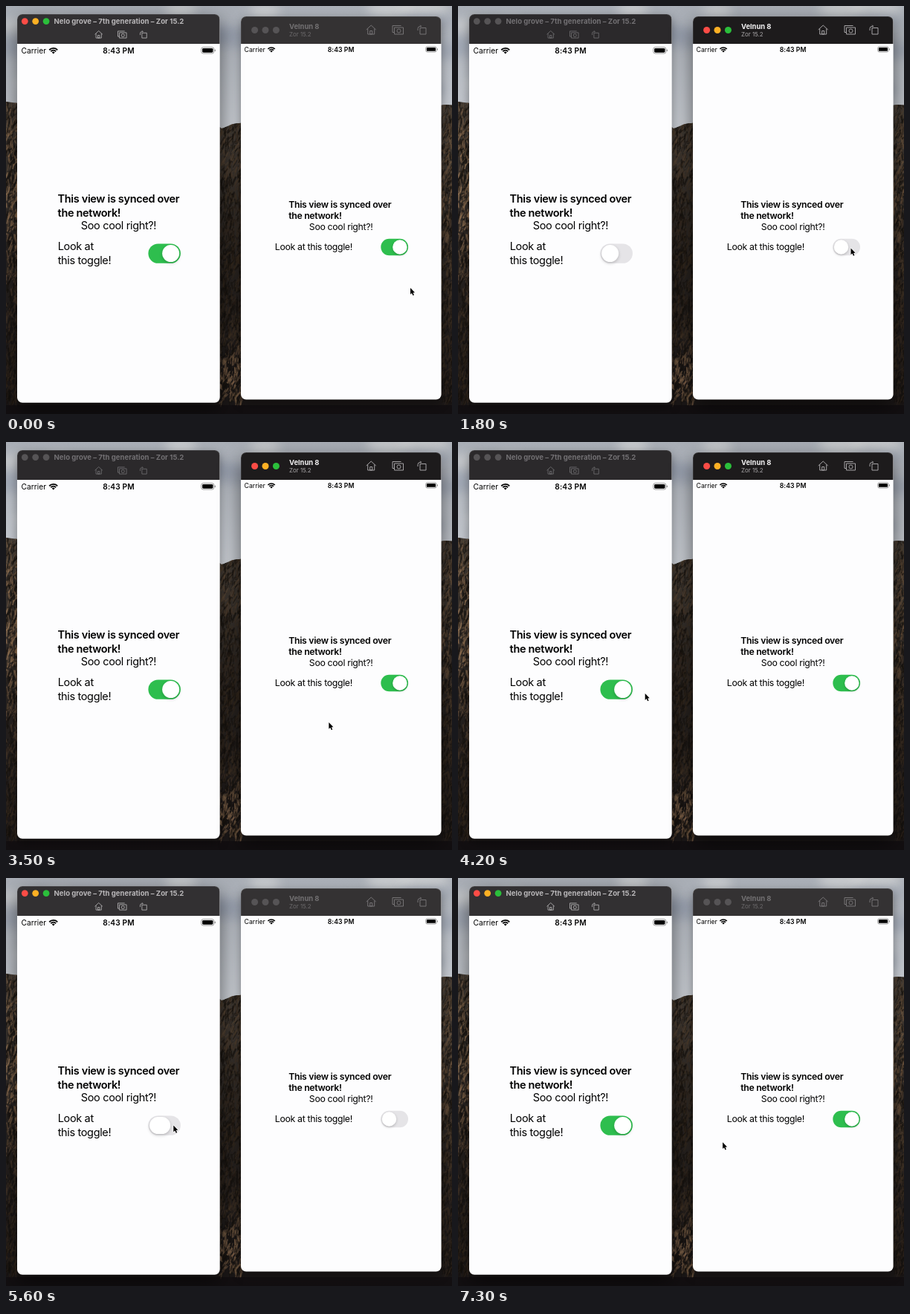
Animation of 600 by 550 pixels, one loop 7.5 s. Source, as an HTML page with a canvas:

```html
<!DOCTYPE html>
<html lang="en">
<head>
<meta charset="utf-8">
<title>Synced toggles</title>
<style>
html, body { margin: 0; width: 100%; height: 100%; overflow: hidden; background: #14110f; }
canvas { display: block; }
</style>
</head>
<body>
<canvas id="stage" width="600" height="550"></canvas>
<script>
const ctx = document.getElementById('stage').getContext('2d');
const LOOP = 7500, TICK = 100, BAR_END = 51;
const FONT = 'Inter, "Liberation Sans", sans-serif';

const clamp = v => Math.max(0, Math.min(1, v));
const mix = (a, b, k) => a + (b - a) * k;
const ramp = (t, start, length) => {
  const v = clamp((t - start) / length);
  return v * v * (3 - 2 * v);
};

function seeded(seed) {
  return () => (seed = (seed * 16807) % 2147483647) / 2147483647;
}

// Mountain backdrop, painted once
const ridge = x => x < 290 ? 129 + x * 0.12 : 164 - (x - 290) * (x < 450 ? 0.25 : 0.1) + Math.sin(x / 5);
const glow = (y, center, spread) => Math.exp(-(((y - center) / spread) ** 2));
function sunlight(x, y) {
  if (x < 20) return glow(y, 250, 130);
  return x < 320 ? 0.3 * glow(y, 200, 50) + 0.8 * glow(y, 510, 45) : 0.5 * glow(y, 240, 130);
}

function paintBackdrop() {
  const canvas = document.createElement('canvas');
  canvas.width = 600;
  canvas.height = 550;
  const c = canvas.getContext('2d');
  const rand = seeded(41);

  const sky = c.createLinearGradient(0, 0, 0, 170);
  sky.addColorStop(0, '#a9aeb6');
  sky.addColorStop(1, '#c9cdd3');
  c.fillStyle = sky;
  c.fillRect(0, 0, 600, 170);
  c.filter = 'blur(7px)';
  for (let i = 0; i < 26; i++) {
    c.fillStyle = i % 2 ? 'rgba(228,227,226,.5)' : 'rgba(132,144,164,.4)';
    c.beginPath();
    c.ellipse(rand() * 600, rand() * 140, 14 + rand() * 30, 5 + rand() * 10, 0, 0, 7);
    c.fill();
  }
  c.filter = 'none';

  c.beginPath();
  c.moveTo(0, 550);
  for (let x = 0; x <= 600; x += 2) c.lineTo(x, ridge(x));
  c.lineTo(600, 550);
  c.clip();
  const rock = c.createLinearGradient(0, 120, 0, 550);
  rock.addColorStop(0, '#443d36');
  rock.addColorStop(0.5, '#282320');
  rock.addColorStop(1, '#1a1616');
  c.fillStyle = rock;
  c.fillRect(0, 0, 600, 550);

  // Slanted streaks, brighter where the sun falls
  c.lineCap = 'round';
  for (const left of [0, 287, 584]) {
    const width = left === 287 ? 30 : 17;
    for (let i = 0; i < width * 45; i++) {
      const x = left + rand() * width, y = 120 + rand() * 420;
      const shade = rand() < 0.5 ? 0.12 : 0.3 + sunlight(x, y) * (0.4 + rand() * 0.5);
      c.strokeStyle = `rgba(${[172, 134, 98].map(v => Math.round(v * shade))},.5)`;
      c.lineWidth = 0.6 + rand() * 2;
      c.beginPath();
      c.moveTo(x, y);
      c.lineTo(x - 2 + rand() * 7, y - 2 - rand() * 9);
      c.stroke();
    }
  }
  c.fillStyle = 'rgba(14,10,14,.6)';
  c.fillRect(0, 538, 600, 12);
  return canvas;
}
const backdrop = paintBackdrop();

function text(str, x, y, size, weight, color, spacing = 0, align = 'left') {
  ctx.font = `${weight} ${size}px ${FONT}`;
  ctx.letterSpacing = `${size * spacing}px`;
  ctx.textAlign = align;
  ctx.fillStyle = color;
  ctx.fillText(str, x, y);
}

function box(x, y, w, h, r, fill) {
  ctx.beginPath();
  ctx.roundRect(x, y, w, h, r);
  if (fill) {
    ctx.fillStyle = fill;
    ctx.fill();
  }
}

function disc(x, y, r, fill) {
  ctx.beginPath();
  ctx.arc(x, y, r, 0, Math.PI * 2);
  ctx.fillStyle = fill;
  ctx.fill();
}

// Toolbar icons, each traced around its own centre
function traceHome() {
  ctx.moveTo(-6.5, 0);
  ctx.lineTo(0, -6);
  ctx.lineTo(6.5, 0);
  ctx.moveTo(-4.5, -1.5);
  ctx.lineTo(-4.5, 6);
  ctx.lineTo(4.5, 6);
  ctx.lineTo(4.5, -1.5);
  ctx.rect(-1.5, 1.5, 3, 4.5);
}

function traceCamera() {
  ctx.moveTo(-5, 3.5);
  ctx.lineTo(-7, 3.5);
  ctx.lineTo(-7, -5.5);
  ctx.lineTo(4.5, -5.5);
  ctx.rect(-4.5, -3, 12, 9);
  ctx.moveTo(4, 1.5);
  ctx.arc(1.5, 1.5, 2.5, 0, Math.PI * 2);
}

function traceRotate() {
  ctx.rect(-2.8, -2.5, 8, 8.5);
  ctx.moveTo(-5.8, 1);
  ctx.arcTo(-5.8, -4.5, -1, -4.5, 3);
  ctx.lineTo(-1, -4.5);
  ctx.lineTo(-2.6, -6.3);
}

function icons(x, y, gap, s, color) {
  [traceHome, traceCamera, traceRotate].forEach((trace, i) => {
    ctx.save();
    ctx.translate(x + gap * i - (i === 2 ? 3 * s : 0), y);
    ctx.scale(s, s);
    ctx.strokeStyle = color;
    ctx.lineWidth = 1;
    ctx.lineJoin = 'round';
    ctx.beginPath();
    trace();
    ctx.stroke();
    ctx.restore();
  });
}

function wifi(x, y, s) {
  const from = -Math.PI * 0.755, to = -Math.PI * 0.245;
  ctx.strokeStyle = ctx.fillStyle = '#000';
  ctx.lineWidth = 2.2 * s;
  for (const r of [5.6, 9]) {
    ctx.beginPath();
    ctx.arc(x, y, r * s, from, to);
    ctx.stroke();
  }
  ctx.beginPath();
  ctx.moveTo(x, y);
  ctx.arc(x, y, 3.3 * s, from, to);
  ctx.fill();
}

function battery(x, y, s) {
  box(x, y, 20 * s, 10 * s, 3 * s);
  ctx.strokeStyle = '#858585';
  ctx.lineWidth = 0.8;
  ctx.stroke();
  box(x + 1.6 * s, y + 1.6 * s, 16.8 * s, 6.8 * s, 1.7 * s, '#000');
  box(x + 21 * s, y + 3.4 * s, 1.4 * s, 3.2 * s, 0.6, '#858585');
}

// on: 0..1, press: 0..1 widens the knob
function toggle(x, cy, s, on, press) {
  const w = 51 * s, h = 31 * s, r = 13.5 * s;
  const rgb = [[229, 46], [228, 190], [231, 78]].map(([a, b]) => Math.round(mix(a, b, on)));
  box(x, cy - h / 2, w, h, h / 2, `rgb(${rgb})`);
  const knob = 2 * r + 7 * s * press;
  ctx.save();
  ctx.shadowColor = 'rgba(0,0,0,.2)';
  ctx.shadowBlur = 5 * s;
  ctx.shadowOffsetY = 2 * s;
  box(x + 2 * s + (w - 4 * s - knob) * on, cy - r, knob, 2 * r, r, '#fff');
  ctx.restore();
}

function lights(x, y, r, active) {
  ['#fc4c46', '#fdb024', '#2bbf3b'].forEach((color, i) => disc(x + 14.4 * i, y, r, active ? color : '#565456'));
}

function frame(x, y, w, h, active, bar) {
  ctx.save();
  ctx.shadowColor = active ? 'rgba(0,0,0,.55)' : 'rgba(0,0,0,.4)';
  ctx.shadowBlur = active ? 28 : 14;
  ctx.shadowOffsetY = active ? 10 : 5;
  box(x, y, w, h, 7, '#fdfdfe');
  ctx.restore();
  ctx.save();
  ctx.beginPath();
  ctx.rect(x, y, w, BAR_END - y);
  ctx.clip();
  box(x, y, w, h, 7, bar);
  box(x + 0.4, y + 0.4, w - 0.8, h, 7);
  ctx.strokeStyle = 'rgba(125,125,128,.32)';
  ctx.lineWidth = 0.8;
  ctx.stroke();
  ctx.restore();
}

// Phone screen in points, scaled by s
function screen({ s, left, right, mid, headX, headY, labelX, label, switchX, switchY }, on, press) {
  const status = BAR_END + 15.2 * s, body = 17 * s, line = 22 * s;
  text('Carrier', left, status, 12 * s, 400, '#000');
  wifi(left + 50.6 * s, status + 0.6, s);
  text('8:43 PM', mid, status, 12 * s, 600, '#000', 0.01, 'center');
  battery(right - 29.6 * s, BAR_END + 5.3 * s, s);

  text('This view is synced over', headX, headY, body, 600, '#000', -0.024);
  text('the network!', headX, headY + line, body, 600, '#000', -0.024);
  text('Soo cool right?!', mid, headY + 42.5 * s, body, 400, '#000', -0.024, 'center');
  label.forEach((row, i) => text(row, labelX, 329.3 + line * i, body, 400, '#000', -0.024));
  toggle(switchX, switchY, s, on, press);
}

const small = {
  s: 0.853, left: 20.6, right: 288, mid: 151.5, headX: 69.6, headY: 265,
  labelX: 69.7, label: ['Look at', 'this toggle!'], switchX: 191.4, switchY: 333.6
};
const large = {
  s: 0.72, left: 320.6, right: 586, mid: 450.6, headX: 380.2, headY: 271.5,
  labelX: 361.8, label: ['Look at this toggle!'], switchX: 504.3, switchY: 325
};

function leftWindow(active, on, press) {
  frame(15, 11, 272.7, 523.7, active, active ? '#323032' : '#2b292b');
  lights(25.3, 20.6, 4.4, active);
  text('Nelo grove – 7th generation – Zor 15.2', 64.5, 24, 9.6, 700, active ? '#b9b7b9' : '#727073');
  icons(124.7, 38.3, 31.4, 0.8, active ? '#bcbabc' : '#737174');
  screen(small, on, press);
}

function rightWindow(active, on, press) {
  frame(316, 14, 269.6, 516.5, active, active ? '#1d1b1c' : '#343233');
  lights(334.6, 32.5, 4.5, active);
  text('Velnun 8', 381, 31, 9.4, 700, active ? '#f4f3f4' : '#737173');
  text('Zor 15.2', 381, 41, 7.9, 400, active ? '#a9a7a9' : '#6c6a6c');
  icons(491.2, 32, 35.8, 1, active ? '#a5a3a5' : '#747274');
  screen(large, on, press);
}

// Pointer moves: start, length, destination
const home = [544, 380];
const moves = [[0, 600, 528.5, 326.5], [3100, 400, 434.3, 378], [3500, 900, 225.3, 333.5], [6700, 600, 356, 356.3]];

function pointerAt(t) {
  return moves.reduce(([x, y], [start, length, toX, toY]) => {
    const k = ramp(t, start, length);
    return [mix(x, toX, k), mix(y, toY, k)];
  }, home);
}

function pointer(x, y) {
  ctx.save();
  ctx.translate(x, y);
  ctx.scale(0.86, 0.86);
  ctx.beginPath();
  [[0, 0], [0, 10.2], [2.3, 8.1], [4, 11.9], [5.7, 11.2], [4.1, 7.5], [7, 7.2]].forEach(p => ctx.lineTo(...p));
  ctx.closePath();
  ctx.lineJoin = 'round';
  ctx.strokeStyle = '#fff';
  ctx.lineWidth = 1.4;
  ctx.stroke();
  ctx.fillStyle = '#000';
  ctx.fill();
  ctx.restore();
}

// Each press: finger down, release (which flips the switch)
const rightPresses = [[900, 1100], [2350, 2600]];
const leftPresses = [[4500, 4900], [5450, 6000]];
const flips = [...rightPresses, ...leftPresses].map(([, up]) => up);
const stateAt = t => flips.reduce((v, up, i) => mix(v, i % 2, ramp(t, up, 300)), 1);
const pressAt = (t, presses) =>
  presses.reduce((sum, [down, up]) => sum + ramp(t, down, 200) * (1 - ramp(t, up, 200)), 0);

function draw(t) {
  const rightActive = t >= 700 && t < 4400;
  const lag = 100, fromRight = t < 4400;
  const left = () => leftWindow(!rightActive, stateAt(fromRight ? t - lag : t), pressAt(t, leftPresses));
  const right = () => rightWindow(rightActive, stateAt(fromRight ? t : t - lag), pressAt(t, rightPresses));
  ctx.drawImage(backdrop, 0, 0);
  (rightActive ? [left, right] : [right, left]).forEach(paint => paint());
  pointer(...pointerAt(t));
}

const start = performance.now();
function loop() {
  const t = (performance.now() - start) % LOOP;
  draw(Math.floor(t / TICK) * TICK);
  requestAnimationFrame(loop);
}
loop();
</script>
</body>
</html>
```
